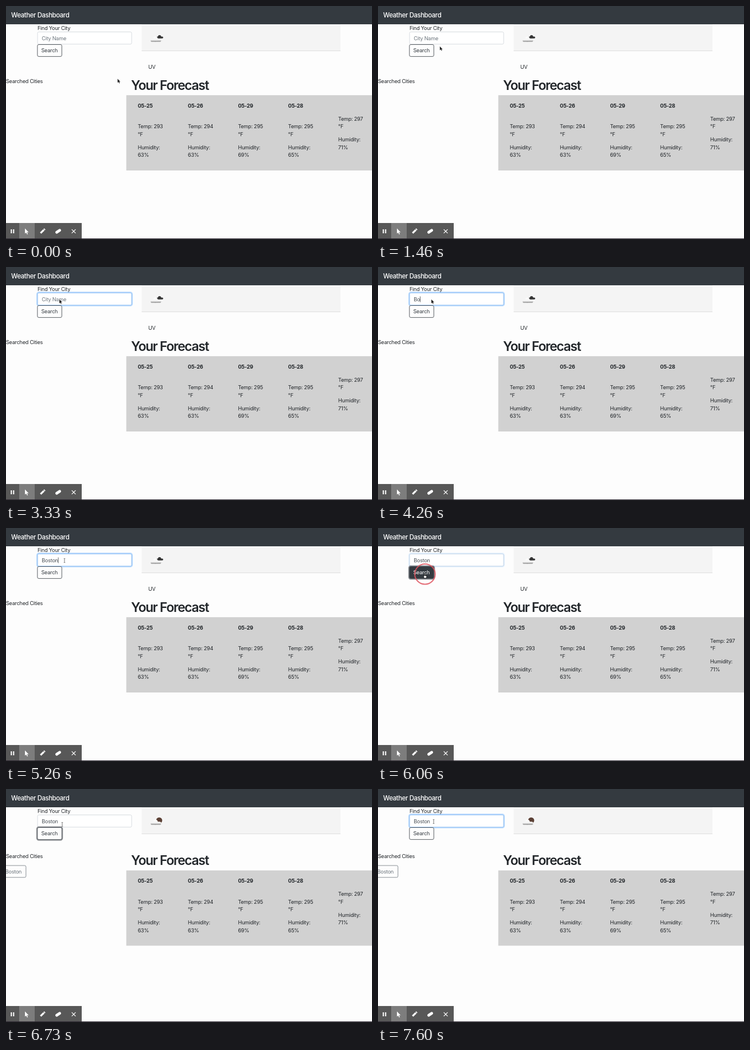
Recreate the animation shown at these times as an HTML page with a canvas. Size 638 by 408 pixels, loop 8000 ms.

```html
<!DOCTYPE html>
<html lang="en">
<head>
<meta charset="utf-8">
<title>Weather Dashboard</title>
<style>
  html, body { margin: 0; width: 100%; height: 100%; overflow: hidden; background: #fdfdfd; }
  canvas { display: block; width: 638px; height: 408px; }
</style>
</head>
<body>
<canvas id="stage"></canvas>
<script>
const W = 638, H = 408, LOOP = 8000, REM = 9.07, ROW = REM * 1.5;
const canvas = document.getElementById('stage');
const ctx = canvas.getContext('2d');
const dpr = window.devicePixelRatio || 1;
canvas.width = W * dpr;
canvas.height = H * dpr;

const INK = '#212529', DARK = '#343a40', GRAY = '#6c757d', WHITE = '#fff';
const FIELD = { x: 55, y: 45.4, w: 164, h: 21.4 };
const BUTTON = { x: 54.8, y: 67.5, w: 42.5, h: 20.9 };

// Events, in ticks of 1/15 s
const FOCUS = 43, TYPE = 57, PRESS = 91, RESULT = 93, REFOCUS = 106;

// Pointer stops: tick at which the move begins, destination
const STOPS = [
  { at: 0, x: 194.5, y: 127.5 },
  { at: 6, x: 147, y: 89 },
  { at: 13, x: 122, y: 74 },
  { at: 20, x: 103, y: 69.5 },
  { at: 27, x: 93, y: 56.8 },
  { at: 77, x: 105, y: 57 },
  { at: 86, x: 81.5, y: 80 },
  { at: 97, x: 98, y: 62 },
  { at: 102, x: 97, y: 57 }
];
const DAYS = ['05-25 293 63', '05-26 294 63', '05-29 295 69', '05-28 295 65', ' 297 71'];

const clamp = v => Math.max(0, Math.min(1, v));
const between = (k, a, b) => k >= a && k < b;
const ramp = (k, start, n) => clamp((k - start + 1) / n);
const easeOut = p => 1 - Math.pow(1 - p, 1.5);
const inside = (b, x, y) => between(x, b.x, b.x + b.w) && between(y, b.y, b.y + b.h);

function pointerAt(k) {
  let { x, y } = STOPS[0];
  for (const stop of STOPS.slice(1)) {
    const p = easeOut(ramp(k, stop.at, 5));
    x += (stop.x - x) * p;
    y += (stop.y - y) * p;
  }
  return [x, y];
}

function rect(x, y, w, h, fill) {
  ctx.fillStyle = fill;
  ctx.fillRect(x, y, w, h);
}

function disc(x, y, r, fill) {
  ctx.fillStyle = fill;
  ctx.beginPath();
  ctx.arc(x, y, r, 0, 7);
  ctx.fill();
}

function box({ x, y, w, h }, fill, stroke, line = 0.8, grow = 0) {
  ctx.beginPath();
  ctx.roundRect(x - grow, y - grow, w + 2 * grow, h + 2 * grow, 2.3 + grow);
  if (fill) { ctx.fillStyle = fill; ctx.fill(); }
  if (stroke) { ctx.strokeStyle = stroke; ctx.lineWidth = line; ctx.stroke(); }
}

// y is the middle of the capitals
function text(str, x, y, color = INK, size = REM, weight = 400, track = -0.025) {
  ctx.font = `${weight} ${size}px Inter, Roboto, sans-serif`;
  ctx.letterSpacing = `${size * track}px`;
  ctx.fillStyle = color;
  ctx.fillText(str, x, y + size * 0.36);
  return ctx.measureText(str).width;
}

function place(x, y, draw, scale = 1, turn = 0) {
  ctx.save();
  ctx.translate(x, y);
  ctx.scale(scale, scale);
  ctx.rotate(turn);
  draw();
  ctx.restore();
}

function cloud(x, y, w, fill) {
  place(x, y, () => {
    ctx.fillStyle = fill;
    ctx.beginPath();
    ctx.roundRect(0, 0.3, 1, 0.28, 0.14);
    ctx.fill();
    disc(0.45, 0.33, 0.24, fill);
  }, w);
}

function weatherIcon(clear) {
  if (clear) disc(267, 55, 5.3, '#5b4035');
  else cloud(262.5, 50, 11.5, '#353535');
  const shade = ctx.createLinearGradient(0, 0.1, 0, 0.58);
  shade.addColorStop(0, WHITE);
  shade.addColorStop(0.7, '#f0f0f0');
  shade.addColorStop(1, '#777');
  cloud(252, 51.8, 18.5, shade);
}

function header(clear) {
  rect(0, 0, W, 32, DARK);
  text('Weather Dashboard', 9, 16, WHITE, REM * 1.25, 500, -0.034);
  rect(236.5, 32, 346.5, 46, '#f4f4f4');
  rect(236.5, 78, 346.5, 0.8, '#d8d8d8');
  weatherIcon(clear);
}

function field(k) {
  const focus = ramp(k, FOCUS + 1, 3) - ramp(k, PRESS - 1, 3) + ramp(k, REFOCUS, 3);
  const x = FIELD.x + 7.3, y = 56.6;
  text('Find Your City', 55, 39);
  if (focus > 0) box(FIELD, null, `rgba(0,123,255,${0.28 * focus})`, 1.9, 1.1);
  box(FIELD, WHITE, '#ced4da');
  if (focus > 0) box(FIELD, null, `rgba(128,189,255,${focus})`);

  const count = Math.max(0, Math.floor((k - TYPE) / 3.75) + 1);
  const typed = 'Boston'.slice(0, count);
  const width = typed ? text(typed, x, y, '#495057') : 0;
  if (!typed) text('City Name', x, y, GRAY);
  if (between(k, FOCUS, 50) || between(k, TYPE, 90) || between(k, REFOCUS, 114)) {
    rect(x + width, 51.5, 0.7, 10, INK);
  }
}

function button(k) {
  const ring = ramp(k, PRESS - 2, 2) - ramp(k, REFOCUS, 3);
  const hover = ramp(k, 87, 3) - ramp(k, 98, 3);
  if (ring > 0) box(BUTTON, null, `rgba(52,58,64,${0.55 * ring})`, 2, 1);
  box(BUTTON, '#fdfdfd', DARK);
  if (hover > 0) box(BUTTON, `rgba(52,58,64,${hover})`);
  text('Search', 61.5, 78, hover > 0.5 ? WHITE : DARK);
}

function forecast(loaded) {
  const top = loaded ? -ROW : 0;
  text('Searched Cities', 0, 131.6 + top);
  if (loaded) {
    box({ x: -8, y: 134, w: 42.8, h: 20.8 }, null, GRAY);
    text('Boston', -1.2, 144.4, GRAY);
  } else {
    text('UV', 248, 106.4);
  }
  text('Your Forecast', 218, 138.8 + top, INK, REM * 2.5, 600, -0.055);
  rect(209.7, 156.2 + top, W - 209.7, 131.8, '#d1d1d1');
  DAYS.forEach((day, i) => {
    const [date, temp, humidity] = day.split(' ');
    const x = 229.7 + i * 87.35;
    const y = 211.2 + top - (date ? 0 : ROW);
    text(date, x, 174.6 + top, INK, REM, 700);
    text('Temp: ' + temp, x, y);
    text('°F', x, y + ROW);
    text('Humidity:', x, y + ROW * 2.67);
    text(humidity + '%', x, y + ROW * 3.67);
  });
}

function arrow(fill, edge) {
  const shape = new Path2D('M0 0V7.6L1.8 6L3.2 8.8L4.3 8.3L3 5.6H5.4Z');
  if (edge) {
    ctx.strokeStyle = edge;
    ctx.lineWidth = 0.8;
    ctx.stroke(shape);
  }
  ctx.fillStyle = fill;
  ctx.fill(shape);
}

function toolbar() {
  rect(0, 407, W, 1, '#2b2630');
  rect(0, 380, 132, 27, '#585858');
  rect(23, 380, 27, 27, '#7d7d7d');
  for (const x of [8.3, 12.3]) rect(x, 391, 2, 7, WHITE);
  place(33, 389.5, () => arrow(WHITE), 1.2);
  place(63.5, 394.5, () => {
    rect(-4.5, -1.6, 8, 3.2, WHITE);
    rect(4.2, -1.6, 1.7, 3.2, WHITE);
  }, 1, -Math.PI / 4);
  place(91, 394.5, () => box({ x: -5.5, y: -2.4, w: 11, h: 4.8 }, WHITE), 1, -0.6);
  for (const side of [-1, 1]) {
    place(118, 394.5, () => rect(-4.8, -0.6, 9.6, 1.2, WHITE), 1, side * Math.PI / 4);
  }
}

function beam() {
  rect(-0.4, -4, 0.8, 8, '#444');
  for (const y of [-4.4, 3.8]) rect(-1.5, y, 3, 0.6, '#444');
}

function hand() {
  box({ x: -1, y: 0, w: 2, h: 6 }, WHITE, '#111', 1, -0.2);
  box({ x: -2.2, y: 3.6, w: 6, h: 5.2 }, WHITE, '#111', 1);
}

function pointer(k) {
  const [x, y] = pointerAt(k);
  const typing = between(k, 50, 77);
  place(x, y, () => {
    if (inside(BUTTON, x, y)) hand();
    else if (inside(FIELD, x, y) && !typing) beam();
    else arrow('#222', WHITE);
  }, 0.9);

  for (const start of [FOCUS, PRESS, REFOCUS]) {
    const alpha = 1 - (k - start) / 2;
    if (k < start || alpha <= 0) continue;
    ctx.strokeStyle = `rgba(224,84,96,${0.85 * alpha})`;
    ctx.lineWidth = 2;
    ctx.beginPath();
    ctx.arc(x + 0.4, y + 0.7, 17.8, 0, 7);
    ctx.stroke();
  }
}

function draw(ms) {
  const k = Math.floor((ms + 7) * 0.015);
  ctx.setTransform(dpr, 0, 0, dpr, 0, 0);
  rect(0, 0, W, H, '#fdfdfd');
  header(k >= RESULT + 5);
  field(k);
  button(k);
  forecast(k >= RESULT);
  toolbar();
  pointer(k);
}

const began = performance.now();
function loop() {
  draw((performance.now() - began) % LOOP);
  requestAnimationFrame(loop);
}
loop();
</script>
</body>
</html>
```
